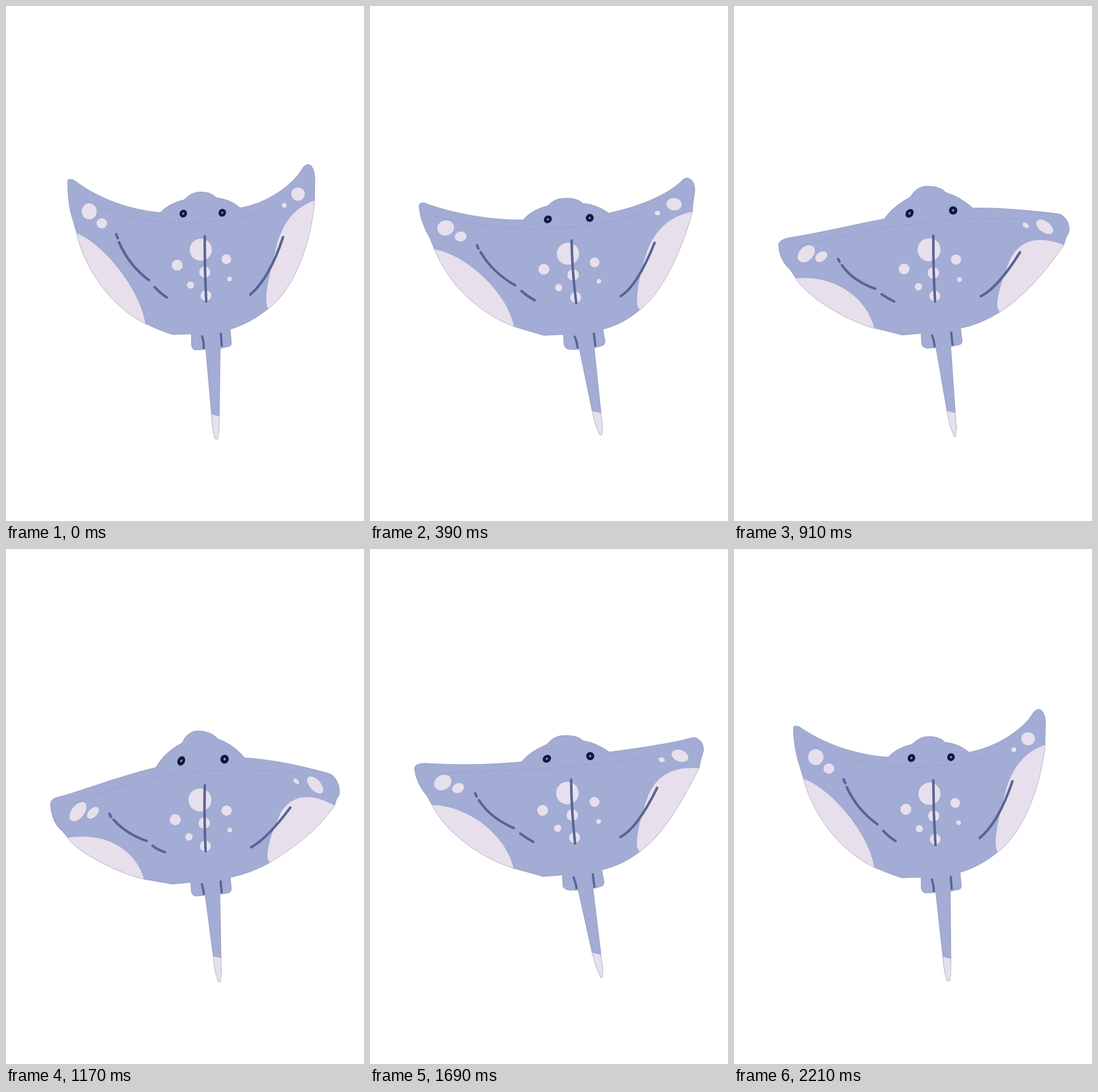
Write an HTML page that moves like this. It is 624 by 898 pixels and loops after 2340 ms.

```html
<!DOCTYPE html>
<html lang="en">
<head>
<meta charset="utf-8">
<title>Swimming ray</title>
<style>
  html, body { margin: 0; width: 100%; height: 100%; overflow: hidden; background: #fff; }
  svg { display: block; width: 100%; height: 100%; }
</style>
</head>
<body>
<svg id="stage" viewBox="0 0 624 898">
  <defs><clipPath id="skin"><path id="skinPath"/></clipPath></defs>
</svg>
<script>
const STEP = 130, HALF = 9;
const BODY = '#a2acd4', PALE = '#e7dfec', LINE = '#5a6394', DARK = '#14173a';

// Every shape has four poses, at steps 0, 3, 7 and 9 of the downstroke.
const leftTop = [
  'M107.5 306Q107 302 112 302Q117 302 122 306C165 338 220 356 269 360',
  'M85.5 349Q85 344 91 343Q97 343 102 346C150 362 205 373 267 373',
  'M77.5 418Q77 412 84 408Q90 404 105 402.5C155 394 210 381 262 371',
  'M77.5 447Q77 440 82 436Q86 433 104 429C155 413 212 392 261 381'];
const head = [
  'Q284 344 310 338Q324 324 338 324Q358 324 366 334Q392 337 408 352',
  'Q280 356 310 348Q322 335 340 335Q361 334 371 344Q396 346 416 361',
  'Q276 350 307 333Q319 314 336 314Q360 314 369 325Q394 332 416 352',
  'Q276 354 307 338Q316 317 335 317Q359 318 369 331Q396 340 416 364'];
const rightWing = [
  'C455 344 500 312 516 284Q521 276 527 276Q537 278 538.5 300L538 325L538 340C530 430 495 500 457 528Q428 552 391 564',
  'C470 350 520 328 543 305Q548 299 555 300Q566 304 566.5 322L563 345L562 359C545 422 512 498 470 530Q443 554 406 564',
  'C465 351 520 357 564 362Q573 363 578 371Q586 381 584 394L579 404L575 417C548 455 515 500 463 534Q430 555 395 562',
  'C465 367 515 378 560 390.5Q569 392 574 400Q583 412 581 429L576 437L573 447C548 484 515 512 460 547Q428 565 391 573'];
const tail = [
  'L393 588Q393 593 388 594L373.5 597L372 715L371 745Q369 748 369.5 754Q366 757 364 754L363 748Q360 745 358 712L348 599',
  'L410 585Q409 592 403 593L391 596L403 711L405.5 738Q404 742 405 746Q402 750 400 747L398 742Q394 737 387 706L365 599',
  'L398 584Q397 590 392 591L378 594L386 711L388 738Q386 743 387 750Q385 753 383 750L381 743Q377 738 371 706L352 596',
  'L393 593Q392 599 387 600L373 602L375 714L375.5 742Q374 747 374 754Q371 757 369 753L368 747Q364 742 361 710L347 604'];
const leftEdge = [
  'L330 600Q323 599 323 588L323 572L290 573Q268 566 243 554C178 522 134 450 123 396L112 358Q107 332 107.5 306Z',
  'L349 599Q339 598 338 590L337 573L303 574.5Q284 569 251 559C190 535 140 490 112 424L104 404Q87 375 85.5 349Z',
  'L336 597Q328 595 327 590L326 571L293 574Q275 569 245 562C205 552 130 512 107 474L98 460Q80 445 77.5 418Z',
  'L331 605.5Q324 604 323 598L322 581.5L289 584.5Q270 581 241 576C205 568 130 535 107 503L98 492Q80 478 77.5 447Z'];
const outline = [0, 1, 2, 3].map(i =>
  [leftTop, head, rightWing, tail, leftEdge].map(part => part[i]).join(''));

const leftPatch = [
  'M123 396C175 418 236 500 243 556', 'M112 424C168 434 240 500 251 560',
  'M106 475C175 468 232 508 245 564', 'M106 504C175 492 228 526 241 578'
].map(d => d + 'L70 600Z');
const rightPatch = [
  'M539 338.5C500 352 480 382 470 425C460 465 452 500 454 518Q455 526 459 530',
  'M564 358C530 365 503 382 486 420C474 450 463 500 466 521Q468 528 473 533',
  'M578 418C545 404 505 400 484 437C474 457 457 505 459 524Q461 532 466 537',
  'M577 450C540 428 502 423 480 458C469 480 453 520 456 540Q458 545 462 550'
].map(d => d + 'L620 600Z');
const tailTip = ['352 710.5', '381 704.5', '365 704.5', '355 708.5'].map(p => `M${p}l28 7v55h-28z`);

// x y rx [ry rotation]
const spots = [
  ['339.5 425 19.3', '345 432 19.3', '340 425 20', '338 437.5 20'],
  ['298.5 452 9.5', '303 459 9.5', '296.5 458.5 9.5', '295 472 9.7'],
  ['346.5 464 9.7', '354 469 10', '347.5 465.5 10', '345.5 478 10'],
  ['348.5 505 9.3', '358.5 508 9.5', '350 505.5 9.5', '347.5 518 9.5'],
  ['384 441.5 8.5', '391.5 447 8.6', '387 442 8.8', '384.5 456 9'],
  ['389.5 476 4', '399 480 4.1', '393 477 4.1', '390 490 4.1'],
  ['321.5 486.5 6.2', '329 491 6.3', '321.5 489.5 6.4', '319 502 6.4'],
  ['145 358 13 14 0', '132 387 14.8 13.2 -15', '126 432 17.5 12 -45', '125.5 458 19.5 11 -52'],
  ['167 379 9.3 9 0', '158 402 10.3 8.6 -10', '152 437 11.5 8 -36', '151.5 460 12.5 7.5 -45'],
  ['509 328 11.8 11.5 0', '530 345.5 13.3 10.8 8', '541.5 385 17 9.5 37', '539 411.5 18 9.5 48'],
  ['485 347.5 4.3 4.2 0', '501 361 4.9 4 8', '508.5 382.5 6 4 35', '506 405 6 3.5 42']
];
const eyes = [
  ['309 362 6.4 7 30', '310 372 6.4 7.2 55', '306 361.5 6.4 8.2 38', '305.5 369.5 6.4 8.5 27'],
  ['377 360.5 6.4 6.8 30', '383 369.5 6.8 7 40', '382 356.5 7.3 7.3 30', '381 366.5 7.2 7.8 20']
];
const strokes = [
  ['M346.5 401.5Q346 460 349 515', 'M351.5 409Q352 460 359.5 518', 'M347.5 400.5Q347 460 350.5 515', 'M346.5 412Q345 470 348 527'],
  ['M192 398L195 405', 'M186.5 417L189 423', 'M181.5 441L184 446', 'M180.5 462L183 467'],
  ['M197 412Q215 453 249 478', 'M193 429.5Q214 465 253 487', 'M188 452Q207 479 246 493', 'M187.5 472Q210 497 245 509'],
  ['M259 490Q268 500 280 508', 'M264 497Q275 507 287 513', 'M257.5 502.5Q268 510 279 515', 'M255.5 517.5Q265 525 277 528.5'],
  ['M483 403Q459 475 426 503', 'M496 413Q466 488 437 506', 'M498.5 429.5Q460 491 430.5 506', 'M495.5 451Q456 504 427.5 520'],
  ['M341.5 574.5Q345 586 345 598', 'M356.5 575Q361 586 362 597', 'M345 573Q349 584 350 595', 'M341 583Q344 593 345 603'],
  ['M374.5 570L376 594', 'M390 570L393 594', 'M378.5 568L381 592', 'M374 578L376 600']
];
const seam = [
  'M127 332Q210 378 310 378Q400 377 460 354', 'M112 366Q210 389 300 389Q400 386 470 362',
  'M104 422Q215 391 300 382Q400 367 505 372', 'M104 450Q200 408 285 395Q360 379 515 390'];

const stage = document.getElementById('stage');
const skinPath = document.getElementById('skinPath');
const parts = [];

function add(name, attrs, parent = stage) {
  const el = document.createElementNS('http://www.w3.org/2000/svg', name);
  for (const key in attrs) el.setAttribute(key, attrs[key]);
  return parent.appendChild(el);
}

// Smooth curve through the four poses, at rest at both ends.
function spline([a, b, c, d], k) {
  const d0 = (b - a) / 3, d1 = (c - b) / 4, d2 = (d - c) / 2;
  const mb = (8 * d0 + 5 * d1 - 2 * d2) / 9;
  const mc = (3 * d1 + 6 * d2 - mb) / 6;
  const [p, q, mp, mq, start, span] =
    k < 3 ? [a, b, 0, mb, 0, 3] : k < 7 ? [b, c, mb, mc, 3, 4] : [c, d, mc, 0, 7, 2];
  const t = (k - start) / span, u = 1 - t;
  return p * u * u * (1 + 2 * t) + q * t * t * (3 - 2 * t) + span * t * u * (mp * u - mq * t);
}

function blender(poses) {
  const number = /-?\d+(\.\d+)?/g;
  const values = poses.map(p => p.match(number).map(Number));
  return k => {
    let i = 0;
    return poses[0].replace(number, () => {
      const v = spline(values.map(row => row[i]), k);
      i++;
      return v.toFixed(2);
    });
  };
}

function addPath(poses, attrs, parent) {
  const el = add('path', attrs, parent), blend = blender(poses);
  parts.push(k => el.setAttribute('d', blend(k)));
  return el;
}

function addOval(poses, fill, scale = 1) {
  const el = add('ellipse', { fill }), blend = blender(poses);
  parts.push(k => {
    const [x, y, rx, ry = rx, turn = 0] = blend(k).split(' ').map(Number);
    el.setAttribute('rx', rx * scale);
    el.setAttribute('ry', ry * scale);
    el.setAttribute('transform', `translate(${x} ${y}) rotate(${turn})`);
  });
}

const skin = addPath(outline, { fill: BODY });
const patches = add('g', { 'clip-path': 'url(#skin)', fill: PALE });
[leftPatch, rightPatch, tailTip].forEach(p => addPath(p, {}, patches));
addPath(outline, { fill: 'none', stroke: '#4a4f70', 'stroke-width': .6, 'stroke-opacity': .5 });
addPath(seam, { fill: 'none', stroke: LINE, 'stroke-width': .6, 'stroke-opacity': .28, 'stroke-dasharray': '9 3 22 2' });
spots.forEach(s => addOval(s, PALE));
strokes.forEach((s, i) => addPath(s, {
  fill: 'none', stroke: LINE, 'stroke-width': i < 5 ? 4.4 : 3.8, 'stroke-linecap': i < 5 ? 'round' : 'butt'
}));
eyes.forEach(e => {
  addOval(e, DARK);
  addOval(e, '#8f98bd', .27);
});

let shown = -1;
function draw() {
  const step = Math.floor(performance.now() / STEP) % (2 * HALF);
  if (step !== shown) {
    shown = step;
    const k = HALF - Math.abs(step - HALF);
    parts.forEach(update => update(k));
    skinPath.setAttribute('d', skin.getAttribute('d'));
  }
  requestAnimationFrame(draw);
}
draw();
</script>
</body>
</html>
```
